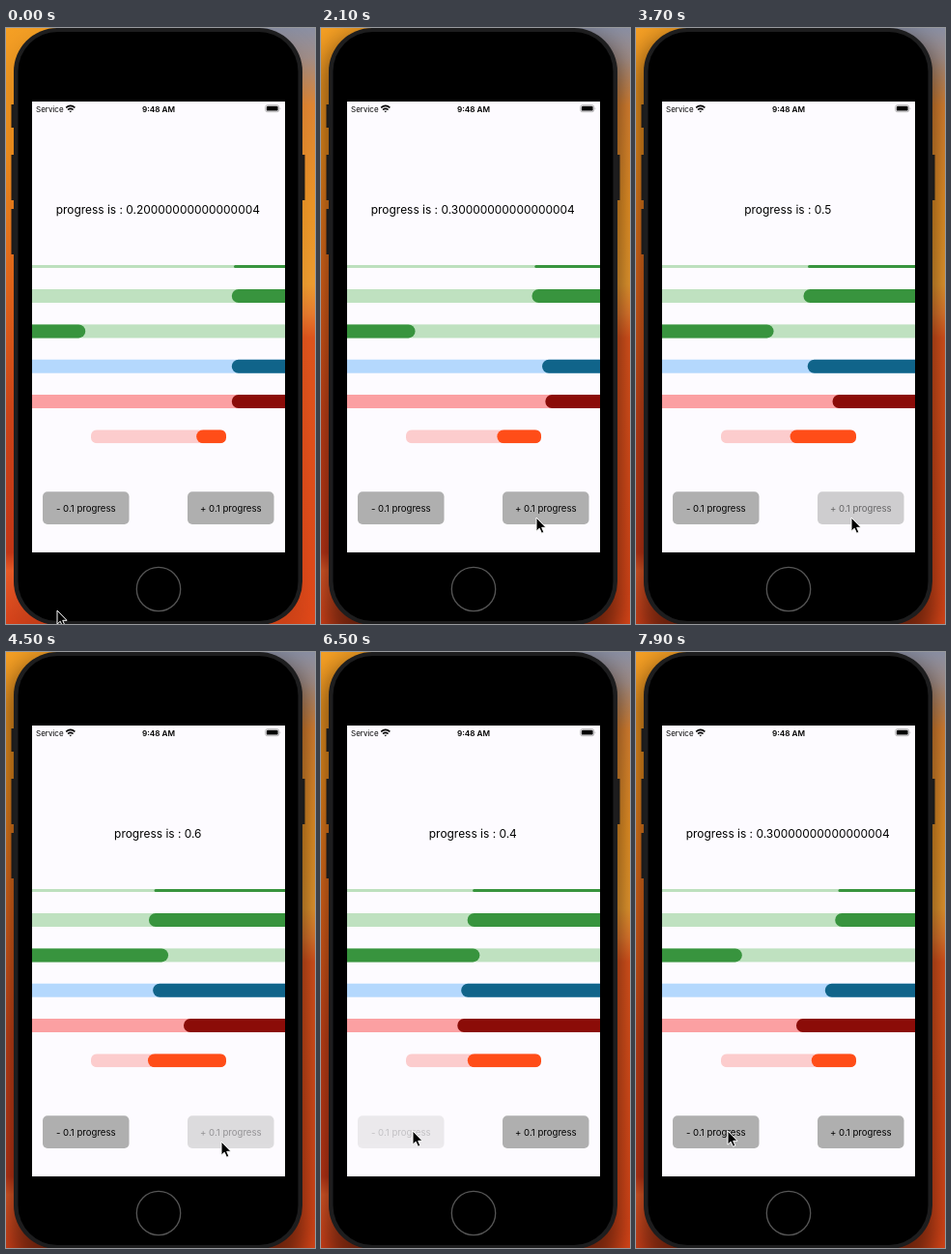
An HTML page that plays this animation: 320 by 616 pixels, repeating every 8000 ms.

```html
<!DOCTYPE html>
<html lang="en">
<head>
<meta charset="utf-8">
<title>Progress bars</title>
<style>
  html, body { margin: 0; width: 100%; height: 100%; overflow: hidden; background: #000; }
  svg { display: block; width: 320px; height: 616px; font-family: Inter, Roboto, sans-serif; }
  text { text-anchor: middle; }
</style>
</head>
<body>
<svg viewBox="0 0 320 616">
  <defs>
    <linearGradient id="left" x2="0" y2="1">
      <stop offset="0" stop-color="#f5a025"/><stop offset=".2" stop-color="#f5921e"/>
      <stop offset=".42" stop-color="#ee6c1c"/><stop offset=".65" stop-color="#d9481a"/>
      <stop offset=".88" stop-color="#cf3a18"/><stop offset=".91" stop-color="#f4602a"/>
      <stop offset="1" stop-color="#df451b"/>
    </linearGradient>
    <linearGradient id="right" x2="0" y2="1">
      <stop offset="0" stop-color="#8a8fa3"/><stop offset=".05" stop-color="#a4908a"/>
      <stop offset=".13" stop-color="#e88a34"/><stop offset=".3" stop-color="#f49a28"/>
      <stop offset=".43" stop-color="#f5a232"/><stop offset=".48" stop-color="#f08030"/>
      <stop offset=".52" stop-color="#e8581e"/><stop offset="1" stop-color="#e64a1a"/>
    </linearGradient>
    <filter id="blur" x="-30%" y="-30%" width="160%" height="160%"><feGaussianBlur stdDeviation="14"/></filter>
    <clipPath id="screen"><path d="M27 76h262v466H27z"/></clipPath>
    <clipPath id="pill"><rect x="88" y="415.3" width="140" height="14" rx="6"/></clipPath>
  </defs>

  <rect width="160" height="616" fill="url(#left)"/>
  <rect x="160" width="160" height="616" fill="url(#right)"/>
  <rect id="shadow" x="4" y="8" width="307" height="640" rx="46" filter="url(#blur)"/>

  <path d="M5.5 79h5v24h-5zM5.5 131h5v47h-5zM5.5 187h5v47h-5zM305 131h4.500v47h-4.500z" fill="#1b1a1a"/>
  <rect x="8" y="0" width="299" height="617" rx="45" fill="#1d1d1e"/>
  <rect x="12.500" y="4" width="290" height="609" rx="41" fill="#000"/>
  <circle cx="158" cy="580" r="22.700" fill="#000" stroke="#565656" stroke-width="1.300"/>
  <path d="M27 76h262v466H27z" fill="#fdfbff"/>

  <text x="31" y="86.700" font-size="8" style="text-anchor:start">Service</text>
  <text x="158" y="86.700" font-size="8.200" font-weight="600">9:48 AM</text>
  <g fill="none" stroke="#000" stroke-width="1.600">
    <path d="M62.200 82.300q4.600 -3.900 9.200 0M64 84.500q2.800 -2.300 5.600 0"/>
    <path d="M65.400 85.700h2.800l-1.400 1.600z" fill="#000" stroke="none"/>
  </g>
  <rect x="268.700" y="79.700" width="14" height="7" rx="2" fill="none" stroke="#999" stroke-width=".7"/>
  <rect x="269.800" y="80.800" width="11.800" height="4.800" rx="1.200"/>
  <path d="M283.700 82v2.400q1.200 -1.200 0 -2.400z" fill="#999"/>

  <text id="label" x="157.300" y="192" font-size="11.950"></text>
  <g id="bars"></g>

  <g id="minus"><rect x="38" y="479.300" width="89.500" height="33.700" rx="5" fill="#afafaf"/>
    <text x="82.800" y="499.600" font-size="9.600">- 0.1 progress</text></g>
  <g id="plus"><rect x="188" y="479.300" width="89.500" height="33.700" rx="5" fill="#afafaf"/>
    <text x="232.800" y="499.600" font-size="9.600">+ 0.1 progress</text></g>

  <path id="cursor" d="M0 0V14.200L3.200 11.200L5.500 16.300L7.900 15.200L5.700 10.300H10z"
    stroke="#fff" stroke-width="1" stroke-linejoin="round"/>
</svg>
<script>
const $ = id => document.getElementById(id);
const START = 0.20000000000000004;
// [release time, step]
const clicks = [[1833, .1], [2645, .1], [3561, .1], [4398, .1], [5767, -.1], [6460, -.1], [7302, -.1]];
// [time, x, y]
const path = [[0, 53, 602], [1000, 53, 602], [1400, 207, 511], [1600, 223, 506],
  [4700, 223, 506], [5250, 96, 494], [5700, 95, 495], [8000, 95, 495]];
// top, height, duration, track, fill, left, width, grows from the left
const bars = [
  [245, 3, 500, '#bde0be', '#38943e'],
  [270, 14, 500, '#bfe1c0', '#38943e'],
  [306.4, 14, 500, '#bfe1c0', '#38943e', 27, 262, true],
  [342.7, 14, 1000, '#b4d8fd', '#10648a'],
  [379, 14, 2000, '#fba0a2', '#8b0c08'],
  [415.3, 14, 300, '#fccccd', '#ff4d18', 88, 140]
].map(([y, h, time, track, color, x = 27, w = 262, fromLeft]) => {
  const group = add($('bars'), 'g', { 'clip-path': `url(#${w < 262 ? 'pill' : 'screen'})` });
  add(group, 'rect', { x, y, width: w, height: h, fill: track });
  const fill = add(group, 'rect', { y, height: h, rx: h / 2, fill: color });
  return { x, w, h, time, fromLeft, fill };
});

function add(parent, tag, attrs) {
  const el = document.createElementNS('http://www.w3.org/2000/svg', tag);
  for (const key in attrs) el.setAttribute(key, attrs[key]);
  return parent.appendChild(el);
}

const clamp = x => Math.min(1, Math.max(0, x));
const half = x => (2 * x) ** 1.68 / 2;
const ease = x => (x = clamp(x)) < .5 ? half(x) : 1 - half(1 - x);

// Each click retargets the bar from wherever it currently is.
function progress(t, time) {
  let value = START, goal = START;
  clicks.forEach(([at, step], i) => {
    if (t < at) return;
    goal += step;
    const end = Math.min(t, clicks[i + 1]?.[0] ?? t);
    value += (goal - value) * ease((end - at) / time);
  });
  return value;
}

function opacity(t, sign) {
  let result = 1;
  for (const [at, step] of clicks) {
    if (step * sign < 0) continue;
    const dim = t < at + 15 ? ease((t - at + 120) / 100) : 1 - ease((t - at - 15) / 250);
    result = Math.min(result, 1 - .8 * dim);
  }
  return result;
}

function cursorAt(t) {
  const i = path.findIndex(p => p[0] > t);
  const [t0, x0, y0] = path[i - 1], [t1, x1, y1] = path[i];
  const k = (t - t0) / (t1 - t0);
  return `translate(${x0 + (x1 - x0) * k} ${y0 + (y1 - y0) * k})`;
}

function draw(now) {
  const t = Math.floor(Math.max(0, now) % 8000 / 100) * 100;
  const value = clicks.reduce((sum, [at, step]) => t >= at ? sum + step : sum, START);
  $('label').textContent = 'progress is : ' + value;
  for (const { x, w, h, time, fromLeft, fill } of bars) {
    const size = progress(t, time) * (w + h);
    // The hidden end runs past the track so that it stays square.
    fill.setAttribute('x', fromLeft ? x - h : x + w - size);
    fill.setAttribute('width', size + h);
  }
  $('minus').setAttribute('opacity', opacity(t, -1));
  $('plus').setAttribute('opacity', opacity(t, 1));
  $('shadow').setAttribute('opacity', t < 1750 ? .12 : .55);
  $('cursor').setAttribute('transform', cursorAt(t));
  requestAnimationFrame(draw);
}
draw(performance.now());
</script>
</body>
</html>
```
